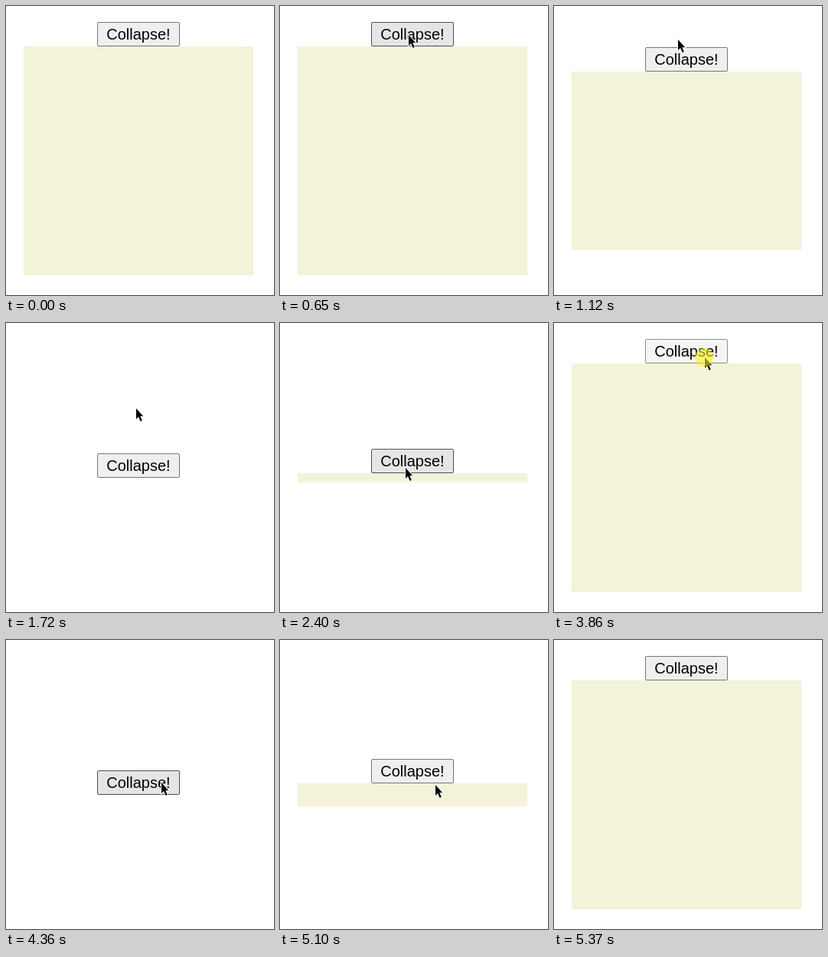
An HTML page for the animation above (6030 ms loop, 350 by 379 pixels).

```html
<!DOCTYPE html>
<html lang="en">
<head>
<meta charset="utf-8">
<title>Collapse</title>
<style>
  html, body { margin: 0; width: 100%; height: 100%; overflow: hidden; background: #fff; }
  #stage { position: relative; width: 350px; height: 379px; overflow: hidden; }
  #column {
    position: absolute; left: 23px; top: 0; width: 300px; height: 374px;
    display: flex; flex-direction: column; align-items: center; justify-content: center;
  }
  #button {
    flex: none; box-sizing: border-box; width: 108px; height: 32px;
    border: 1px solid #767676; border-radius: 2px; background: #efefef; color: #000;
    font: 20px/30px "Liberation Sans", Arial, sans-serif;
    text-align: center; white-space: nowrap;
  }
  #button.hover { background: #e5e5e5; border-color: #4f4f4f; }
  #button.press { background: #f5f5f5; border-color: #8d8d8d; }
  #panel { flex: none; width: 300px; height: 300px; background: #f3f3da; }
  #pointer { position: absolute; left: 0; top: 0; width: 0; height: 0; }
  #pointer svg { position: absolute; left: 0; top: -1px; overflow: visible; }
  #pointer path { fill: #000; stroke: #fff; stroke-width: 1.6; paint-order: stroke; }
  #halo {
    position: absolute; left: -13px; top: -13px; width: 24px; height: 24px;
    border-radius: 50%; background: rgba(250, 240, 20, .6);
  }
</style>
</head>
<body>
<div id="stage">
  <div id="column">
    <div id="button">Collapse!</div>
    <div id="panel"></div>
  </div>
  <div id="pointer">
    <svg width="10" height="17"><path d="M0 0V14L3 11L5.6 17L7.8 16L5.3 10.2H9.2Z"/></svg>
    <div id="halo"></div>
  </div>
</div>
<script>
  const LOOP = 6030, FULL = 300, TOGGLE = 300, MIDDLE = 187;
  const $ = id => document.getElementById(id);
  const clamp = v => Math.min(1, Math.max(0, v));
  const bezier = (a, b, c, u) => (1 - u) ** 2 * a + 2 * u * (1 - u) * b + u * u * c;
  const easeOut = u => 1 - (1 - u) ** 3;

  // CSS "ease": cubic-bezier(.25, .1, .25, 1), solved by bisection
  function ease(x) {
    let lo = 0, hi = 1;
    for (let i = 0; i < 24; i++) {
      const s = (lo + hi) / 2;
      if (.75 * s * (1 - s) + s ** 3 < x) lo = s; else hi = s;
    }
    return .3 * lo * (1 - lo) ** 2 + 3 * lo * lo * (1 - lo) + lo ** 3;
  }

  // Mouse down and up; every release toggles the panel
  const clicks = [[1020, 1071], [2290, 2383], [3860, 3960], [4975, 5070]];

  // Pointer strokes: when, the bend of the curve and where it ends
  const ENTER = 320, LEAVE = 5370, START = [325, 76];
  const strokes = [
    { from: 320, to: 830, bend: [230, -26], end: [162, 45] },
    { from: 1400, to: 1530, bend: [162, 49], end: [163, 53] },
    { from: 1630, to: 2190, bend: [177, 128], end: [164, 191] },
    { from: 2860, to: 3190, bend: [172, 100], end: [197, 54] },
    { from: 3370, to: 3550, bend: [197, 50], end: [197, 46] },
    { from: 4230, to: 4360, bend: [199, 117], end: [203, 188] },
    { from: 4480, to: 4680, bend: [204, 196], end: [205, 204] },
    { from: 4760, to: 4920, bend: [204, 198], end: [203, 191] },
    { from: 5130, to: 5370, bend: [256, 245], end: [318, 304] }
  ];

  function tipAt(t) {
    let tip = START;
    for (const { from, to, bend, end } of strokes) {
      if (t < from) break;
      const u = easeOut(clamp((t - from) / (to - from)));
      tip = tip.map((v, i) => bezier(v, bend[i], end[i], u));
    }
    return tip.map(Math.round);
  }

  const heightAt = t => clicks.reduce((h, [, up], i) =>
    h + (i % 2 ? FULL : -FULL) * ease(clamp((t - up) / TOGGLE)), FULL);

  function draw(t) {
    const height = heightAt(t);
    const [x, y] = tipAt(t);
    const top = MIDDLE - (height + 32) / 2;
    const present = t >= ENTER && t < LEAVE;
    const pressed = clicks.some(([down, up]) => t >= down && t < up);
    const over = present && Math.abs(x - 173) < 54 && y >= top && y < top + 32;

    $('panel').style.height = height + 'px';
    $('button').className = pressed ? 'press' : over ? 'hover' : '';
    $('pointer').style.transform = `translate(${x}px, ${y}px)`;
    $('pointer').style.visibility = present ? 'visible' : 'hidden';
    $('halo').style.opacity = pressed ? 1 : 0;
  }

  const began = performance.now();
  function tick() {
    draw((performance.now() - began) % LOOP);
    requestAnimationFrame(tick);
  }
  tick();
</script>
</body>
</html>
```
